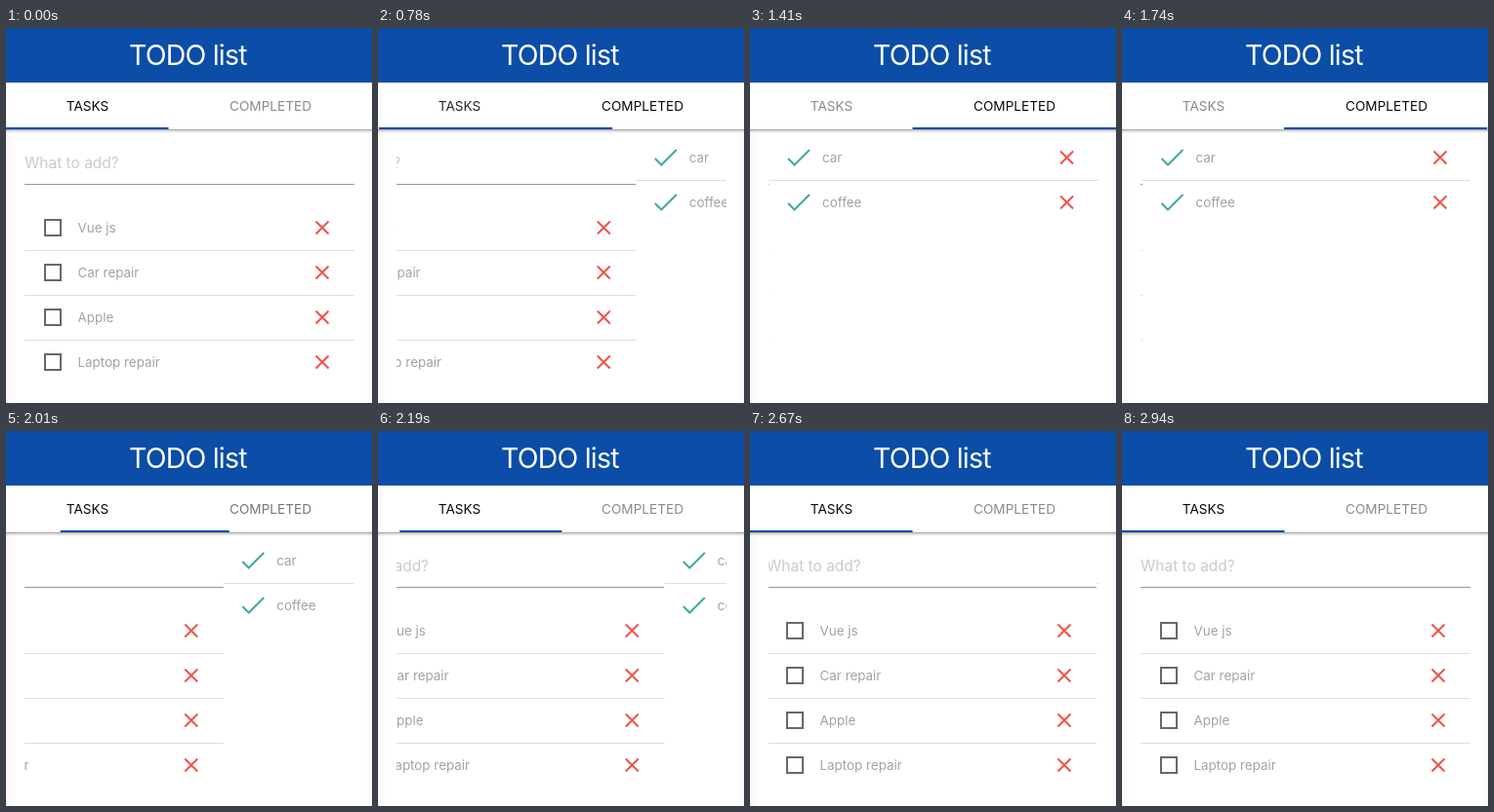
These frames come from a looping animation (375 by 385 pixels, 2970 ms). An HTML page:

```html
<!DOCTYPE html>
<html lang="en">
<head>
<meta charset="utf-8">
<title>TODO list</title>
<style>
  html, body { margin: 0; width: 100%; height: 100%; overflow: hidden; background: #fff; }
  svg { display: block; width: 375px; height: 385px; font-family: Inter, Roboto, sans-serif; }
  .title { font-size: 28.5px; letter-spacing: -.8px; fill: #fff; }
  .tab { font-size: 13.6px; text-anchor: middle; }
  .hint { font-size: 15.5px; fill: #cacaca; }
  .item { font-size: 13.4px; fill: #a2a2a2; }
  .box { fill: none; stroke: #686868; stroke-width: 2; }
  .cross { fill: none; stroke: #f0524a; stroke-width: 2; }
  .check { fill: none; stroke: #3fa9a0; stroke-width: 2; }
</style>
</head>
<body>
<svg viewBox="0 0 375 385">
  <defs>
    <clipPath id="view"><rect x="19" y="104" width="338" height="281"/></clipPath>
    <linearGradient id="shade" x1="0" y1="0" x2="0" y2="1">
      <stop offset="0" stop-color="#000" stop-opacity=".42"/>
      <stop offset=".35" stop-color="#000" stop-opacity=".16"/>
      <stop offset="1" stop-color="#000" stop-opacity="0"/>
    </linearGradient>
  </defs>
  <rect width="375" height="385" fill="#fbfbfb"/>
  <rect x="7" y="104" width="363" height="281" fill="#fff"/>
  <g clip-path="url(#view)">
    <g id="tasks">
      <text class="hint" x="19" y="144">What to add?</text>
      <rect x="19" y="160" width="338" height="1" fill="#969696"/>
    </g>
    <g id="done"></g>
  </g>
  <rect y="104" width="375" height="4" fill="url(#shade)"/>
  <rect y="56" width="375" height="48" fill="#fff"/>
  <rect width="375" height="56" fill="#0b4da7"/>
  <text class="title" x="126" y="38">TODO list</text>
  <text class="tab" id="tabTasks" x="83.5" y="85">TASKS</text>
  <text class="tab" id="tabDone" x="271" y="85">COMPLETED</text>
  <rect id="bar" y="102" height="2" fill="#0b4da7"/>
</svg>
<script>
  const LOOP = 2970, PAGE = 338, SPLIT = 166.5, WIDTH = 375;
  const $ = id => document.getElementById(id);
  const clamp = v => Math.min(1, Math.max(0, v));

  function row(name, y, done, last) {
    const mark = done
      ? `<path class="check" d="M38.5 ${y + 1}L45 ${y + 7.5}L60.5 ${y - 8}"/>`
      : `<rect class="box" x="40" y="${y - 8}" width="16" height="16"/>`;
    const rule = last ? '' : `<rect x="19" y="${y + 23}" width="338" height="1" fill="#dedede"/>`;
    return mark + rule +
      `<text class="item" x="73.5" y="${y + 5}">${name}</text>` +
      `<path class="cross" d="M317.5 ${y - 6.5}l13 13m0 -13l-13 13"/>`;
  }

  function fill(id, names, top, done) {
    const rows = names.map((n, i) => row(n, top + i * 46, done, i === names.length - 1));
    $(id).insertAdjacentHTML('beforeend', rows.join(''));
  }

  fill('tasks', ['Vue js', 'Car repair', 'Apple', 'Laptop repair'], 205, false);
  fill('done', ['car', 'coffee'], 133, true);

  // cubic-bezier(.25, .8, .5, 1)
  function ease(x) {
    if (x <= 0 || x >= 1) return clamp(x);
    const curve = (u, a, b) => 3 * (1 - u) * (1 - u) * u * a + 3 * (1 - u) * u * u * b + u * u * u;
    let lo = 0, hi = 1;
    for (let i = 0; i < 24; i++) {
      const mid = (lo + hi) / 2;
      if (curve(mid, .25, .5) < x) lo = mid; else hi = mid;
    }
    return curve(lo, .8, 1);
  }

  const run = (t, start, length) => ease((t - start) / length);
  const fade = (t, start, length) => clamp((t - start) / length);

  function ink(id, level) {
    const v = Math.round(138 - 128 * level);
    $(id).setAttribute('fill', `rgb(${v},${v},${v})`);
  }

  function draw(t) {
    const shift = PAGE * (run(t, 709, 759) - run(t, 1739, 1080));
    $('tasks').setAttribute('transform', `translate(${-shift} 0)`);
    $('done').setAttribute('transform', `translate(${PAGE - shift} 0)`);

    const left = SPLIT * (run(t, 780, 556) - run(t, 1740, 926));
    const right = SPLIT + (WIDTH - SPLIT) * (run(t, 724, 450) - run(t, 1740, 850));
    $('bar').setAttribute('x', left);
    $('bar').setAttribute('width', right - left);

    ink('tabTasks', 1 - fade(t, 710, 300) + fade(t, 1740, 250));
    ink('tabDone', fade(t, 630, 140) - fade(t, 1760, 300));
  }

  function tick() {
    draw(performance.now() % LOOP);
    requestAnimationFrame(tick);
  }
  tick();
</script>
</body>
</html>
```
